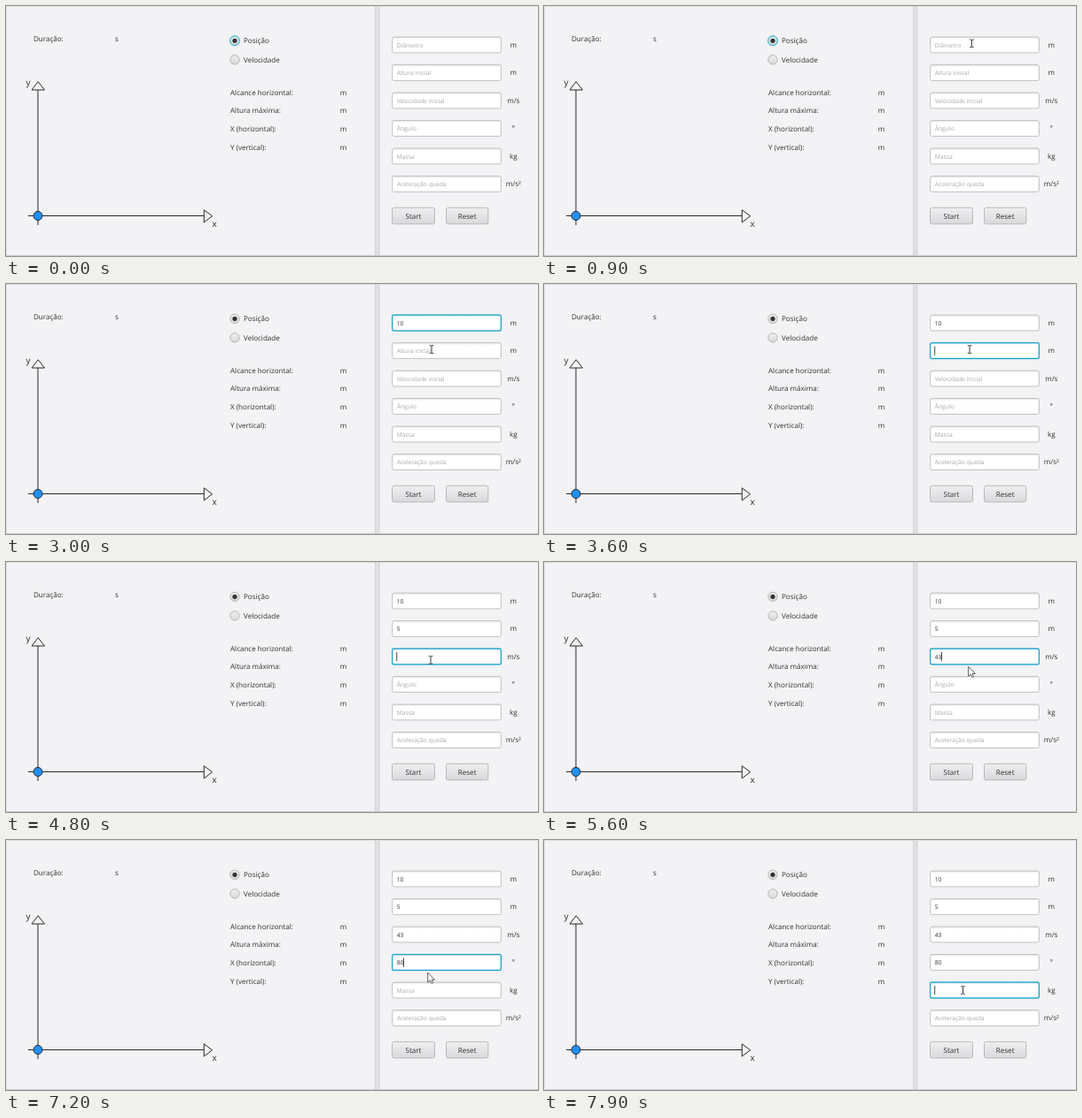
Recreate the animation shown at these times as an HTML page. Size 600 px wide and 283 px high, loop 8000 ms.

```html
<!DOCTYPE html>
<html lang="pt">
<head>
<meta charset="utf-8">
<title>Lançamento</title>
<style>
html, body { margin: 0; width: 100%; height: 100%; overflow: hidden; background: #f3f2f4; }
svg { display: block; width: 100vw; height: 100vh; }
text { font-family: "Open Sans", "Noto Sans", sans-serif; font-size: 8.05px; fill: #303033; text-rendering: geometricPrecision; }
.input { font-size: 6.75px; }
.prompt { fill: #a9a9ac; }
.middle { text-anchor: middle; }
</style>
</head>
<body>
<svg id="stage" viewBox="0 0 600 283" xmlns="http://www.w3.org/2000/svg">
  <defs>
    <linearGradient id="button" x2="0" y2="1">
      <stop stop-color="#efeef0"/><stop offset="1" stop-color="#d9d8da"/>
    </linearGradient>
    <linearGradient id="inset" x2="0" y2="1">
      <stop stop-color="#e9e9ea"/><stop offset=".16" stop-color="#fff"/>
    </linearGradient>
  </defs>
</svg>
<script>
const LOOP = 8000, STEP = 100;
const svg = document.getElementById("stage");

function add(tag, attrs, content) {
  const node = document.createElementNS(svg.namespaceURI, tag);
  for (const key in attrs) node.setAttribute(key, attrs[key]);
  if (content) node.textContent = content;
  return svg.appendChild(node);
}
const label = (x, y, content, cls = "") => add("text", { x, y, class: cls }, content);
const show = (node, visible) => node.setAttribute("visibility", visible ? "visible" : "hidden");

// Window and divider
add("rect", { width: 600, height: 283, fill: "#f3f2f4" });
add("rect", { width: 600, height: .8, fill: "#deddd6" });
add("rect", { width: .7, height: 283, fill: "#d2d2d4" });
add("rect", { y: 282, width: 600, height: 1, fill: "#cbcbcd" });
add("rect", { x: 416.5, width: 4.5, height: 282, fill: "#e3e2e4" });
add("path", { d: "M416.8 0V282M420.8 0V282", stroke: "#c3c3c5", "stroke-width": .7 });

// Readouts
label(31, 40.3, "Duração:");
label(123, 40.3, "s");
["Alcance horizontal:", "Altura máxima:", "X (horizontal):", "Y (vertical):"].forEach((name, i) => {
  const y = 100.5 + i * 20.9;
  label(253, y, name);
  label(376.7, y, "m");
});

// Radio buttons
const radioGlow = add("circle", { cx: 258, cy: 39.3, r: 5.8, fill: "none", stroke: "#c5e7f0", "stroke-width": 1.4 });
const radios = [39.3, 60.8].map(cy =>
  add("circle", { cx: 258, cy, r: 5.2, fill: "url(#button)", stroke: "#b0b0b2", "stroke-width": .9 }));
add("circle", { cx: 258, cy: 39.3, r: 2.6, fill: "#333" });
label(268, 42.2, "Posição");
label(268, 63.7, "Velocidade");

// Axes and ball
add("path", {
  d: "M36 95V248M25 237.5H223M29 95H43.5L36.2 85.7ZM223.3 230.8V245L232.6 237.8Z",
  fill: "none", stroke: "#29292b", "stroke-width": 1
});
label(22.4, 90, "y").style.fontSize = "10px";
label(232.6, 250.2, "x").style.fontSize = "10px";
add("circle", { cx: 36, cy: 237.5, r: 5, fill: "#2290f2", stroke: "#1b2a3a", "stroke-width": 1 });

// Form: focus and key times in ms
const fields = [
  { prompt: "Diâmetro", unit: "m", focus: 1200, value: "10", keys: [2100, 2300] },
  { prompt: "Altura inicial", unit: "m", focus: 3300, value: "5", keys: [3900] },
  { prompt: "Velocidade inicial", unit: "m/s", focus: 4600, value: "43", keys: [5100, 5300] },
  { prompt: "Ângulo", unit: "°", focus: 6100, value: "80", keys: [6700, 6900] },
  { prompt: "Massa", unit: "kg", focus: 7600, value: "", keys: [] },
  { prompt: "Aceleração queda", unit: "m/s²", focus: Infinity, value: "", keys: [] }
];
fields.forEach((field, i) => {
  const y = field.y = 44 + i * 31.5;
  field.glow = add("rect", { x: 434.8, y: y - 9.7, width: 124.4, height: 19.4, rx: 2.6, fill: "#b9e3ef" });
  field.box = add("rect", { x: 435.7, y: y - 8.9, width: 122.6, height: 17.8, rx: 1.9, fill: "url(#inset)" });
  field.text = label(440.7, y + 2.5, "", "input");
  field.caret = add("rect", { x: 440.3, y: y - 5, width: .9, height: 10.2, fill: "#333" });
  label(572.3, y + 2.6, field.unit, "middle");
});

for (const [x, width, name] of [[435.5, 48, "Start"], [496.5, 47.3, "Reset"]]) {
  add("rect", { x, y: 228.4, width, height: 18.4, rx: 2, fill: "url(#button)", stroke: "#b4b4b6", "stroke-width": .9 });
  label(x + width / 2, 240.7, name, "middle");
}

// Pointer
const beam = add("path", { d: "M-2.3-4.3H-.6L0-3.8.6-4.3H2.3M0-3.8V3.8M-2.3 4.3H-.6L0 3.8.6 4.3H2.3", fill: "none", stroke: "#222", "stroke-width": .9 });
const arrow = add("path", { d: "M0 0V11L2.6 8.6 4.3 12.2 6 11.4 4.4 8H7.8Z", fill: "#fff", stroke: "#222", "stroke-width": .7 });
const route = [
  [400, 500, -14], [1000, 481, 47], [1500, 481, 49], [2400, 481, 49], [2900, 480, 74],
  [3900, 480, 74], [4500, 479, 111], [5400, 479, 111], [6000, 477.5, 139.5],
  [7000, 477.5, 139.5], [7500, 472.5, 170], [8000, 472.5, 170]
];

function pointerAt(t) {
  const next = route.findIndex(stop => stop[0] > t);
  if (next === 0) return route[0].slice(1);
  const [t0, x0, y0] = route[next - 1], [t1, x1, y1] = route[next];
  const u = (t - t0) / (t1 - t0), ease = u * u * (3 - 2 * u);
  return [x0 + (x1 - x0) * ease, y0 + (y1 - y0) * ease];
}

function render(t) {
  const active = fields.filter(field => t >= field.focus).length - 1;
  show(radioGlow, active < 0);
  radios[0].setAttribute("stroke", active < 0 ? "#139fc8" : "#b0b0b2");

  fields.forEach((field, i) => {
    const focused = i === active;
    const typed = field.keys.filter(key => key <= t);
    const value = field.value.slice(0, typed.length);
    const lastInput = Math.max(field.focus, ...typed);
    const blinkOn = (t - lastInput) % 1000 < 500;
    show(field.glow, focused);
    field.box.setAttribute("stroke", focused ? "#169fc9" : "#b9b9bb");
    field.box.setAttribute("stroke-width", focused ? 1.2 : .9);
    field.text.textContent = value || (focused ? "" : field.prompt);
    field.text.classList.toggle("prompt", !value);
    field.caret.setAttribute("x", 440.3 + value.length * 3.9);
    show(field.caret, focused && blinkOn);
  });

  const [x, y] = pointerAt(t);
  const overField = fields.some(field => Math.abs(y - field.y) < 9.4);
  show(beam, overField);
  show(arrow, !overField);
  for (const shape of [beam, arrow]) shape.setAttribute("transform", `translate(${x} ${y})`);
}

const start = performance.now();
function tick() {
  const t = (performance.now() - start) % LOOP;
  render(Math.floor(t / STEP) * STEP);
  requestAnimationFrame(tick);
}
tick();
</script>
</body>
</html>
```
